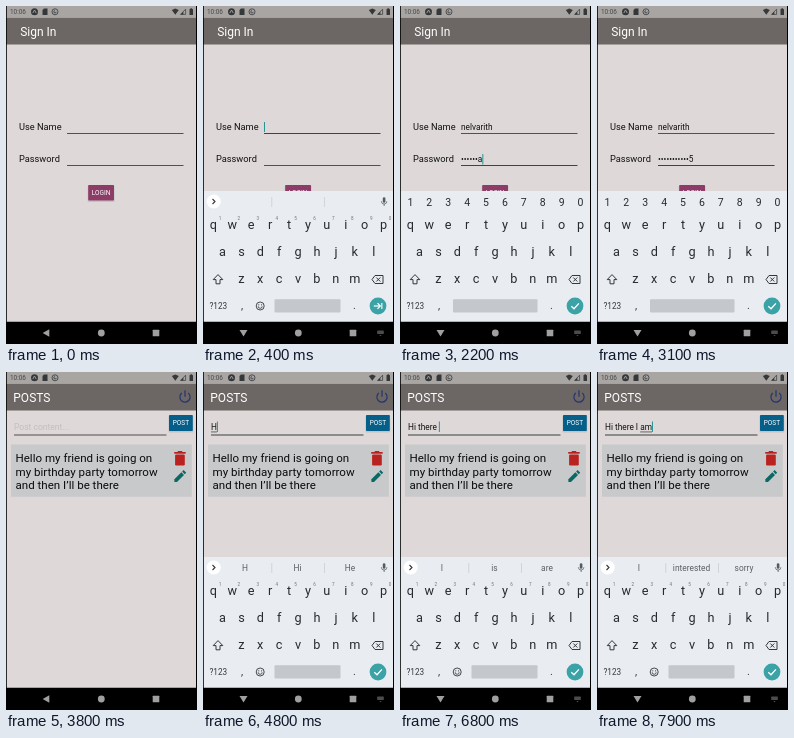
Animation of 191x338 px, one loop 8 s. Source, as an HTML page with a canvas:

```html
<!DOCTYPE html>
<html lang="en">
<head>
<meta charset="utf-8">
<title>Sign in and post</title>
<style>
  html, body { margin: 0; width: 100%; height: 100%; overflow: hidden; background: #ded8d8; }
  canvas { display: block; width: 191px; height: 338px; }
</style>
</head>
<body>
<canvas id="stage"></canvas>
<script>
const W = 191, H = 338, LOOP = 8000;
const canvas = document.getElementById('stage');
const ctx = canvas.getContext('2d');
const ratio = window.devicePixelRatio || 1;
canvas.width = Math.round(W * ratio);
canvas.height = Math.round(H * ratio);

const PAGE = '#ded8d8', STATUS = '#a9a5a3', TEAL = '#3ba2a6', INK = '#34383b';

const clamp = v => Math.max(0, Math.min(1, v));
const ease = v => 1 - (1 - clamp(v)) ** 3;

function rect(x, y, w, h, color, radius = 0) {
  ctx.fillStyle = color;
  ctx.beginPath();
  ctx.roundRect(x, y, w, h, radius);
  ctx.fill();
}

function disc(x, y, r, color) {
  ctx.fillStyle = color;
  ctx.beginPath();
  ctx.arc(x, y, r, 0, Math.PI * 2);
  ctx.fill();
}

function path(points, color, { fill = false, width = 1, close = fill } = {}) {
  ctx.beginPath();
  points.forEach(([x, y]) => ctx.lineTo(x, y));
  if (close) ctx.closePath();
  if (fill) {
    ctx.fillStyle = color;
    ctx.fill();
  } else {
    ctx.strokeStyle = color;
    ctx.lineWidth = width;
    ctx.stroke();
  }
}

function arc(x, y, r, from, to, color, width) {
  ctx.strokeStyle = color;
  ctx.lineWidth = width;
  ctx.beginPath();
  ctx.arc(x, y, r, from, to);
  ctx.stroke();
}

function text(str, x, y, size, color, { align = 'left', weight = 400 } = {}) {
  ctx.font = `${weight} ${size}px Roboto, sans-serif`;
  ctx.textAlign = align;
  ctx.fillStyle = color;
  ctx.fillText(str, x, y);
  return ctx.measureText(str).width;
}

// Typing: each entry is [time, text shown from then on].
function typed(str, times) {
  return times.map((time, i) => [time, str.slice(0, i + 1)]);
}
const evenly = (count, start, end) =>
  Array.from({ length: count }, (_, i) => start + (end - start) * i / (count - 1));

const USER = 'nelvarith', PASS = 'sunnyday2345', POST = 'Hi there I am';
const userSteps = typed(USER, evenly(USER.length, 500, 1250));
const passSteps = typed(PASS, evenly(PASS.length, 1600, 2600));
const postSteps = typed(POST, [4750, 4900, 5050, 5200, 5500, 5800, 6200, 6400, 6550, 6850, 7200, 7350, 7700]);
const hints = [
  [0, ['I', 'The', 'Hi']],
  [4750, ['H', 'Hi', 'He']],
  [4900, ['Hi', 'His', 'Him']],
  [5050, ['there', 'I', 'everyone']],
  [5200, ['t', 'there', 'to']],
  [5500, ['the', 'there', 'The']],
  [6200, ['there', 'their', 'these']],
  [6550, ['I', 'is', 'are']],
  [6850, ['I', "I'm", 'It']],
  [7200, ['am', 'have', 'was']],
  [7700, ['I', 'interested', 'sorry']]
];

function latest(steps, t, fallback) {
  let found = fallback;
  for (const step of steps) if (step[0] <= t) found = step;
  return found;
}

function statusBar() {
  rect(0, 0, W, 11.5, STATUS);
  text('10:06', 4, 8.2, 6.4, '#45494b');
  disc(28.5, 5.8, 3.5, INK);
  path([[26.8, 7], [28.5, 4], [30.2, 7]], STATUS, { width: 0.9 });
  path([[38, 2.5], [41.5, 2.5], [41.5, 9], [36.5, 9], [36.5, 4]], INK, { fill: true });
  arc(49, 5.8, 3, 0, Math.PI * 2, INK, 0.8);
  arc(49, 5.8, 1.2, 0, Math.PI * 1.5, INK, 0.8);
  path([[165.8, 4], [169.3, 2.6], [172.8, 4], [169.3, 8.8]], INK, { fill: true });
  path([[174.6, 8.4], [179.6, 8.4], [179.6, 3.2]], INK, { width: 0.7, close: true });
  path([[174.6, 8.4], [177.4, 8.4], [177.4, 5.5]], INK, { fill: true });
  rect(183.5, 3, 3.5, 6, INK, 0.5);
  rect(184.4, 2.3, 1.7, 1, INK);
}

function header(title, x) {
  rect(0, 11.5, W, 27, '#6c6765');
  text(title, x, 29.6, 12, '#fff');
}

function caret(x, y, height, t, since) {
  if (t >= since && (t - since) % 1000 < 500) rect(x, y, 1, height, '#2a9494');
}

function underline(x, y, w, active) {
  rect(x, y, w, 1, active ? '#3f4344' : '#55504f');
}

function button(label, x, y, w, h, color) {
  rect(x - 0.5, y + 0.5, w + 1, h + 1, 'rgba(0, 0, 0, 0.1)', 1);
  rect(x, y, w, h, color, 0.8);
  text(label, x + w / 2, y + h / 2 + 2.4, 6.5, '#fff', { align: 'center' });
}

function signIn(t) {
  rect(0, 0, W, 316, PAGE);
  header('Sign In', 14.2);
  text('Use Name', 13, 124, 9.25, '#111');
  text('Password', 13, 156.3, 9.25, '#111');
  const onUser = t >= 100 && t < 1400, onPass = t >= 1400 && t < 3450;
  underline(61, 127, 116.5, onUser);
  underline(61, 159, 116.5, onPass);

  const [userTime, user] = latest(userSteps, t, [100, '']);
  const userWidth = text(user, 61, 124, 8.3, '#111');
  if (onUser) caret(61 + userWidth, 116, 10, t, userTime);

  const [passTime, pass] = latest(passSteps, t, [1400, '']);
  const shown = pass && '•'.repeat(pass.length - 1) + (t - passTime < 1500 ? pass.at(-1) : '•');
  const passWidth = text(shown, 61, 156.3, 8.3, '#111');
  if (onPass) caret(61 + passWidth, 148, 10.5, t, passTime);
  button('LOGIN', 82.2, 179, 25.8, 15.5, '#8d3b67');
}

function power() {
  const color = '#24356e';
  arc(179, 25, 5.1, -Math.PI * 0.28, Math.PI * 1.28, color, 1.2);
  rect(178.4, 18.3, 1.2, 6.4, color);
}

function trash() {
  const color = '#b9221e';
  rect(168.2, 80, 11.5, 1.7, color);
  rect(171.7, 79, 4.5, 1.7, color);
  rect(169.1, 82.6, 9.7, 10.9, color, 1.2);
}

function pencil() {
  const color = '#0b6863';
  path([[168.4, 107.3], [175.4, 100.3], [178, 102.9], [171, 109.9], [168.4, 109.9]], color, { fill: true });
  path([[176.1, 99.6], [177.6, 98.1], [180.2, 100.7], [178.7, 102.2]], color, { fill: true });
}

function postField(t) {
  const [time, post] = latest(postSteps, t, [4400, '']);
  if (!post) text('Post content...', 8, 58, 8.5, '#c5bebe');
  const width = text(post, 8, 58.2, 8.3, '#111');
  const word = post.split(' ').pop();
  const wordWidth = ctx.measureText(word).width;
  if (word) rect(8 + width - wordWidth, 59.6, wordWidth, 0.7, '#333');
  caret(8 + width, 49.5, 10.5, t, time);
  underline(8, 62.5, 152.5, t >= 4400);
}

function posts(t) {
  rect(0, 0, W, 316, PAGE);
  header('POSTS', 7.3);
  power();
  postField(t);
  button('POST', 163, 43, 23.8, 16, '#055f88');
  rect(5, 72.5, 180.8, 52.2, '#c8c9cb');
  ['Hello my friend is going on', 'my birthday party tomorrow', 'and then I’ll be there']
    .forEach((line, i) => text(line, 9.5, 90 + i * 13.5, 11.55, '#0b0b0b'));
  trash();
  pencil();
}

function keyRow(keys, x, baseline, size) {
  [...keys].forEach((key, i) =>
    text(key, x + i * 18.9, baseline, size, '#272b2e', { align: 'center' }));
}

function suggestionStrip(words) {
  disc(10.7, 195.5, 7, '#fff');
  path([[9.5, 193], [12, 195.5], [9.5, 198]], INK, { width: 1.1 });
  words.forEach((word, i) => text(word, 42 + i * 52.5, 199, 8.4, '#5b6064', { align: 'center' }));
  [68.5, 121].forEach(x => rect(x, 191, 0.7, 10, '#c5cacd'));
  rect(179.8, 191.3, 2.6, 5.4, '#555b60', 1.3);
  arc(181.1, 195.2, 2.8, 0, Math.PI, '#555b60', 0.7);
  rect(180.7, 198, 0.8, 2, '#555b60');
}

function smiley() {
  arc(57.2, 300, 4, 0, Math.PI * 2, INK, 0.9);
  disc(55.8, 298.8, 0.6, INK);
  disc(58.6, 298.8, 0.6, INK);
  arc(57.2, 300.3, 2, 0, Math.PI, INK, 0.8);
}

function keyboard({ words, digits, next, upper }) {
  rect(0, 185, W, 131, '#e9edf1');
  const letters = row => upper ? row.toUpperCase() : row;
  if (digits) {
    keyRow('1234567890', 10.4, 200, 10.5);
  } else {
    suggestionStrip(words);
    [...'1234567890'].forEach((digit, i) =>
      text(digit, 17 + i * 18.9, 214.2, 4.6, '#70757a', { align: 'center' }));
  }
  keyRow(letters('qwertyuiop'), 10.4, 223.3, 12.7);
  keyRow(letters('asdfghjkl'), 19.5, 250.3, 12.7);
  keyRow(letters('zxcvbnm'), 38.3, 277.3, 12.7);

  path([[10.2, 273.6], [15, 268.6], [19.8, 273.6], [17, 273.6], [17, 277.8], [13, 277.8], [13, 273.6]],
    INK, { fill: upper, close: true });
  path([[169, 273.5], [172, 269.5], [180, 269.5], [180, 277.5], [172, 277.5]], INK, { close: true });
  path([[173.3, 271.5], [177.3, 275.5]], INK);
  path([[177.3, 271.5], [173.3, 275.5]], INK);

  text('?123', 15.3, 303, 8.2, INK, { align: 'center' });
  text(',', 39, 303, 11, INK, { align: 'center' });
  text('.', 151.5, 303, 11, INK, { align: 'center' });
  const barX = digits ? 53 : 71.5;
  if (!digits) smiley();
  rect(barX, 293.2, 137.5 - barX, 13.2, '#c4c8cc', 1);
  disc(175, 300, 8.4, TEAL);
  if (next) {
    path([[170.8, 300], [177, 300]], '#fff', { width: 1.2 });
    path([[174.5, 297.2], [177.3, 300], [174.5, 302.8]], '#fff', { width: 1.2 });
    rect(178.3, 297, 1.1, 6, '#fff');
  } else {
    path([[171.3, 300.2], [174, 302.8], [178.9, 297.4]], '#fff', { width: 1.3 });
  }
}

function navBar(typing) {
  const color = '#a0a0a0';
  rect(0, 315.7, W, 22.3, '#000');
  path(typing ? [[36.5, 324], [44.5, 324], [40.5, 330.5]] : [[43.3, 323.2], [43.3, 330.8], [36.7, 327]], color, { fill: true });
  disc(95.3, 327, 3.4, color);
  rect(146.7, 323.7, 6.6, 6.6, color, 0.5);
  if (typing) {
    rect(174.2, 324.5, 6.6, 3.6, '#4c4c4c', 0.5);
    path([[176.3, 329], [178.7, 329], [177.5, 330.2]], '#4c4c4c', { fill: true });
  }
}

function screenEdges() {
  rect(0, 0, 0.8, H, '#000');
  rect(190, 0, 1, H, '#000');
}

function draw(t) {
  ctx.setTransform(canvas.width / W, 0, 0, canvas.height / H, 0, 0);
  if (t < 3700) signIn(t);
  if (t >= 3500) {
    const enter = ease((t - 3500) / 200);
    ctx.save();
    ctx.globalAlpha = enter;
    ctx.translate(0, (1 - enter) * 18);
    posts(t);
    ctx.restore();
  }
  statusBar();

  const inLogin = t < 4000;
  const raised = inLogin
    ? ease((t - 200) / 200) * (1 - ease((t - 3200) / 200))
    : ease((t - 4450) / 200);
  if (raised > 0) {
    ctx.save();
    ctx.translate(0, (1 - raised) * 131);
    keyboard({
      words: inLogin ? ['', latest(userSteps, t, [0, ''])[1], ''] : latest(hints, t, hints[0])[1],
      digits: inLogin && t >= 1400,
      next: inLogin && t < 1400,
      upper: !inLogin && t < 4750
    });
    ctx.restore();
  }
  navBar(raised > 0);
  screenEdges();
}

function frame() {
  draw(performance.now() % LOOP);
  requestAnimationFrame(frame);
}
frame();
</script>
</body>
</html>
```
